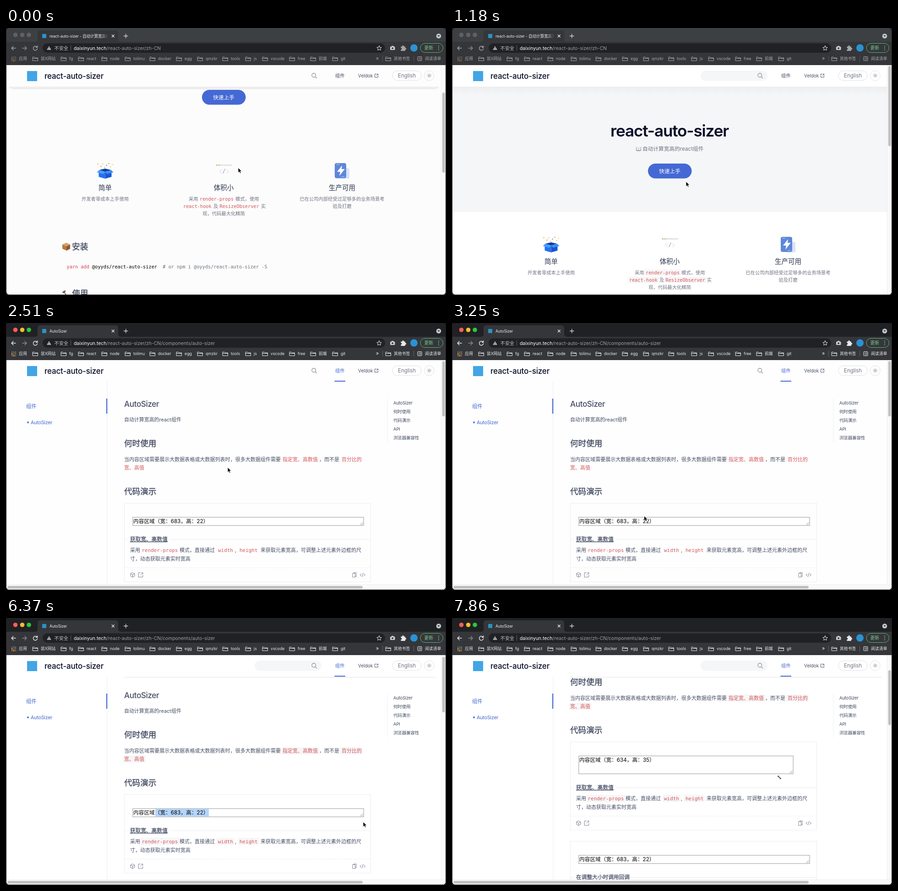
An HTML page for the animation above (8 s loop, 961 by 583 pixels).

```html
<!DOCTYPE html>
<html lang="zh-CN">
<head>
<meta charset="utf-8">
<title>react-auto-sizer</title>
<style>
  html, body { margin: 0; width: 100%; height: 100%; overflow: hidden; background: #21171c; }
  #stage { display: block; width: 100%; height: 100%; }
  text { font-family: Inter, "Noto Sans CJK SC", "Noto Sans CJK", sans-serif; white-space: pre; text-spacing-trim: space-all; }
  .mono { font-family: "DejaVu Sans Mono", "Noto Sans CJK SC", monospace; }
  .mid { text-anchor: middle; }
  .med { font-weight: 500; }
  .tight { letter-spacing: -.025em; }
  .line { fill: none; stroke-linecap: round; stroke-linejoin: round; }
</style>
</head>
<body>
<svg id="stage" viewBox="0 0 961 583"></svg>
<script>
const INK = '#454d64', SOFT = '#717484', BLUE = '#4569d4', RED = '#d4545a', RULE = '#ebedf1';

// Text is placed by its left edge (or middle) and its visual centre line.
const text = (x, cy, str, size, fill, cls = '', more = '') =>
  `<text x="${x}" y="${cy}" dy=".36em" font-size="${size}" fill="${fill}" class="${cls}" ${more}>${str}</text>`;
// The thin outline gives Chinese headings a medium weight.
const heading = (x, cy, str, size, more = '') =>
  text(x, cy, str, size, INK, '', `stroke="${INK}" stroke-width="${size * .022}" ${more}`);
const rect = (x, y, w, h, fill, r = 0, more = '') =>
  `<rect x="${x}" y="${y}" width="${w}" height="${h}" fill="${fill}" rx="${r}" ${more}/>`;
const dot = (x, y, r, fill, more = '') => `<circle cx="${x}" cy="${y}" r="${r}" fill="${fill}" ${more}/>`;
const line = (d, stroke, width = 1, more = '') =>
  `<path class="line" d="${d}" stroke="${stroke}" stroke-width="${width}" ${more}/>`;
const shape = (d, fill, more = '') => `<path d="${d}" fill="${fill}" ${more}/>`;
const group = (id, body, more = '') => `<g id="${id}" ${more}>${body}</g>`;
const at = (x, y, body) => `<g transform="translate(${x} ${y})">${body}</g>`;
const span = (str, fill) => `<tspan fill="${fill}">${str}</tspan>`;
const codeBack = (x, y, w, h) => rect(x, y, w, h, '#f7f6f7', 2, 'class="tinted"');
const openIcon = (x, y, r, c) =>
  at(x, y, line(`M${-r * .1} ${-r}H${-r}V${r}H${r}V${r * .1}M${r * .4} ${-r}H${r}V${-r * .4}M${r} ${-r}L0 0`, c, .9));

function browser() {
  const fg = '#e8eaed', dim = '#9aa0a6', green = '#81c995';
  const folder = x => line(`M${x + .5} 63.5h3.5l1.5 1.5h6v6.5h-11zM${x + .5} 66.5h11`, fg, 1);
  const folders = [[58, '装X网站'], [120, 'fg'], [158, 'react'], [209, 'node'], [260, 'tolimu'], [314, 'docker'],
    [372, 'egg'], [418, 'qmzkr'], [473, 'tools'], [523, 'js'], [560, 'vscode'], [619, 'free'], [665, '前端'],
    [713, 'git'], [829, '其他书签']];
  const apps = ['#ea4335', '#fbbc04', '#4285f4', '#34a853'];
  let grid = '';
  for (let i = 0; i < 9; i++) grid += rect(12 + i % 3 * 3.8, 62.5 + (i / 3 | 0) * 3.8, 2.5, 2.5, apps[i * 3 % 4]);

  return rect(0, 0, 961, 31, '#3c4043', 0, 'id="strip"')
    + [20.5, 35.5, 50].map(x => dot(x, 15, 4.8, '#5f6164', 'class="light"')).join('')
    + rect(0, 30, 961, 51, '#35363a')
    + shape('M63 30Q69 30 69 24V11Q69 5 75 5H239Q245 5 245 11V24Q245 30 251 30Z', '#35363a')
    + rect(79, 13, 9, 9, '#2f8fc4', 1)
    + `<svg x="95" y="5" width="130" height="25">${text(0, 12.5, '', 8.7, fg, '', 'id="tab" letter-spacing="-.02em"')}</svg>`
    + rect(208, 8, 18, 19, 'url(#fade)')
    + line('M231.3 15l5 5m0-5l-5 5', fg, 1.2) + line('M257.5 17.5h8.5m-4.25-4.25v8.5', '#d5d7da', 1.3)
    + dot(945, 17.5, 5.3, '#c4c7ca') + shape('M942.3 16h5.4l-2.7 3.3z', '#35363a')
    + rect(80, 33.5, 748, 20.5, '#202124', 10)
    + shape('M94 39.5l4.7 8.3h-9.4z', '#bdc1c6') + line('M94 42.5v2.3m0 1.6v.1', '#202124', 1)
    + text(105.5, 44, '不安全', 10.2, '#bdc1c6') + line('M141.5 38v11', '#5f6368')
    + text(148, 44, '', 10.4, dim, '', 'id="url"')
    + line('M815 38.8l1.5 3.4 3.7.3-2.8 2.5.8 3.6-3.2-1.9-3.2 1.9.8-3.6-2.8-2.5 3.7-.3z', fg, 1)
    + rect(839, 40.5, 10.5, 7.5, '#c9ccd0', 1.5) + rect(842, 39, 4.5, 3, '#c9ccd0', 1) + dot(844.2, 44.2, 1.9, '#35363a')
    + dot(891, 43.5, 8, '#2a92d6')
    + line('M36 44H45m-4-4l4 4-4 4', '#8b8f94', 1.3)
    + rect(905, 33.5, 49.5, 20, 'none', 10, 'stroke="#5bb974"')
    + text(913.5, 43.5, '更新', 9.8, green) + [39.5, 43.5, 47.5].map(y => dot(945, y, 1, green)).join('')
    + group('chromeInk',
      line('M21 44h-9m4-4l-4 4 4 4', fg, 1.4)
      + line('M67.6 41.5a4.5 4.5 0 1 0 .9 3.5M68.6 39v3.2h-3.2', fg, 1.4)
      + shape('M862.5 40.5h3a1.8 1.8 0 1 1 3.4 0h3v3a1.8 1.8 0 1 1 0 3.4v3h-9.4v-3.2a1.6 1.6 0 1 0 0-3z', fg)
      + grid + text(28, 67, '应用', 9, fg)
      + folders.map(([x, name]) => folder(x) + text(x + 18, 67, name, 8.8, fg)).join('')
      + text(808, 66.5, '»', 11, fg) + line('M822.5 61v12M890.5 61v12', '#5f6368')
      + rect(899, 62.5, 9, 9, 'none', 1, `stroke="${fg}"`)
      + line('M901 65h.2M901 67h.2M901 69h.2M903 65h3M903 67h3M903 69h3', fg, .9)
      + text(915, 67, '阅读清单', 8.9, fg));
}

function header() {
  return rect(0, 81, 951, 47, '#fff', 0, 'id="bar"')
    + rect(46, 94, 22, 22, '#41a5e6')
    + text(84, 105, 'react-auto-sizer', 17.05, '#080e29', 'med', 'letter-spacing="-.012em"')
    + rect(543, 93, 146, 22.5, '#f5f6f7', 11, 'class="tinted"')
    + dot(672.3, 103.2, 4.3, 'none', 'stroke="#7d8089" stroke-width="1.1"') + line('M675.6 106.6l3 3', '#7d8089', 1.2)
    + text(719, 104.5, '组件', 10.35, INK, '', 'id="navLink"')
    + rect(717.5, 126, 23.5, 2, BLUE, 0, 'id="navLine"')
    + text(769, 104.5, 'Veldok', 10, INK) + openIcon(809, 104, 3.5, INK)
    + rect(844, 93.5, 63, 21, '#fff', 10.5, 'stroke="#dfe1e6" fill-opacity=".4"') + text(875.5, 104.2, 'English', 11.4, SOFT, 'mid')
    + dot(924.3, 104, 10.8, 'none', 'stroke="#dfe1e6"') + dot(924.3, 104, 2.2, 'none', `stroke="${SOFT}"`)
    + dot(924.3, 104, 4.4, 'none', `stroke="${SOFT}" stroke-dasharray="1 2.455"`);
}

function home() {
  const bits = [[-16, -14, '#f7b32b'], [-9, -9, '#f59a3c'], [-5, -14, '#ffd257'], [3, -11, '#5aa2ff'], [8, -15, '#f7a52b'],
    [12, -8, '#ffcf4d'], [16, -13, '#fbd37a'], [-1, -6, '#ffb938']];
  const box = bits.map(([x, y, c]) => dot(x, y, 1.3, c)).join('')
    + shape('M-13-1L0-4 13-1 0 3z', '#0d3fa0') + shape('M-14 2L0 3V18L-14 14z', '#2272ef') + shape('M14 2L0 3V18L14 14z', '#1756d2')
    + shape('M-13-1L0 3-4 8-18 4z', '#4a9bff') + shape('M13-1L0 3 4 8 18 4z', '#3c8cf8');
  const snippet = rect(-18, -13, 36, 3, '#e3e3e6', 1) + ['#ee7b63', '#f3bd4f', '#73c06b'].map((c, i) => dot(-16 + i * 3, -11.5, 1, c)).join('')
    + line('M-5-2L-10 2l5 4M5-2l5 4-5 4', '#d3d7e1', 1) + line('M2-3L-2 6', '#7fa8e4', 1.2) + dot(1.8, -2.5, 1, '#f1c75b');
  const bolt = rect(-4, -5, 20, 23, '#d8e3f8', 3) + rect(-16, -16, 25, 33, '#5d87d9', 4)
    + shape('M0-11L-11 3h7l-2 9L6-3h-7z', '#fff') + line('M-12-13h6M-1 14h6', '#c8d7f5', 1.2);
  const red = (x, y, s) => text(x, y, s, 10.25, RED, 'mono');
  const grey = (x, y, s, cls) => text(x, y, s, 10.3, SOFT, cls);
  const titles = [[216.5, '简单'], [475.5, '体积小'], [734, '生产可用']];

  return rect(0, 81, 950, 321, '#f5f6f8', 0, 'id="hero"')
    + text(475, 224, 'react-auto-sizer', 35.1, '#080e29', 'mid', 'font-weight="600" letter-spacing="-.033em"')
    + shape('M402 260l5 1 6-1v8l-6 1-5-1z', '#8a9bab') + shape('M403 260l4 1v6l-4-.8zM412 260l-4.4 1v6l4.4-.8z', '#f0efe9')
    + text(416, 264, '自动计算宽高的react组件', 11.7, SOFT)
    + rect(428, 296, 95.5, 32.5, BLUE, 16.2) + text(475.5, 313, '快速上手', 11.8, '#fff', 'mid')
    + at(216.5, 472, box) + at(476, 472, snippet) + at(734, 472, bolt)
    + titles.map(([x, s]) => text(x, 510, s, 14.5, INK, 'mid', `stroke="${INK}" stroke-width=".2"`)).join('')
    + codeBack(420, 527, 80, 14) + codeBack(384, 543, 68, 14) + codeBack(463, 543, 93, 14)
    + grey(216.5, 534, '开发者零成本上手使用', 'mid')
    + grey(399, 534, '采用') + red(423, 534, 'render-props') + grey(501, 534, '模式，使用')
    + red(387, 550, 'react-hook') + grey(453, 550, '及') + red(466.5, 550, 'ResizeObserver') + grey(557, 550, '实')
    + grey(475.5, 566, '现，代码最大化精简', 'mid')
    + grey(734, 534, '已在公司内部经受过足够多的业务场景考', 'mid') + grey(734, 550, '验及打磨', 'mid')
    + shape('M123 634l9-4 8 4v9l-8 4-9-4z', '#b57b45') + shape('M123 634l9-4 8 4-8 4z', '#d6a368') + shape('M132 638l8-4v9l-8 4z', '#8f5a30')
    + heading(144, 639, '安装', 17.7)
    + text(132.5, 682, span('yarn add', '#de3d58') + ' @oyyds/react-auto-sizer  ' + span('# or npm i @oyyds/react-auto-sizer -S', '#6a737d'), 10.25, '#000', 'mono')
    + line('M127 737l6 10', '#9a6a45', 2) + shape('M122 739l5-5 4 1-4 5z', '#5d6268') + heading(144, 741, '使用', 17.7);
}

function card(y, title, id) {
  const p = (x, cy, s) => text(x, cy, s, 11, INK), c = (x, s) => text(x, 496, s, 10.93, RED, 'mono');
  return at(0, y,
    rect(258.5, 393.5, 538, 171.5, 'none', 0, `id="${id}Frame" stroke="${RULE}"`)
    + rect(276.7, 424.2, 504.5, 18, '#fff', 0, `id="${id}Box" stroke="#b5b5b5" stroke-width="1.4"`)
    + rect(326, 425, 117, 16.5, '#b4d5fd', 0, `id="${id}Pick"`)
    + text(278, 433, '内容区域（宽：683，高：22）', 11.7, '#000', '', `id="${id}Label"`)
    + group(id + 'Grip', line('M774 440.5l5-5m-2 5l2-2', '#777', .8))
    + group(id + 'Foot',
      line('M258.5 472.5H796.5', RULE) + rect(266, 465, 92, 15, '#fefefe')
      + heading(271, 472, title, 11.7, 'text-decoration="underline"')
      + codeBack(293.5, 488, 85, 16) + codeBack(460, 488, 39, 16) + codeBack(506.5, 488, 46, 16)
      + p(271, 496, '采用') + c(296.5, 'render-props') + p(379, 496, '模式，直接通过') + c(463, 'width') + p(500, 496, ',')
      + c(510, 'height') + p(556, 496, '来获取元素宽高，可调整上述元素外边框的尺') + p(271, 515, '寸，动态获取元素实时宽高')
      + line('M258.5 534.5H796.5', RULE, 1, 'stroke-dasharray="2 2"')
      + line('M276.5 545l4.5 2.5v5l-4.5 2.5-4.5-2.5v-5zM272 547.5l4.5 2.5 4.5-2.5M276.5 550v5', SOFT, .9)
      + openIcon(294, 550, 4.8, SOFT)
      + line('M757.5 546.5h5v8.5h-5zM759.5 546v-1h5.5v8.5h-2', SOFT, .9)
      + line('M776 547.5l-3 2.5 3 2.5M781.5 547.5l3 2.5-3 2.5M780 546l-2.5 8', SOFT, .9)));
}

const docs = () => text(258, 177, 'AutoSizer', 17.2, INK, 'med tight')
  + text(258, 211.5, '自动计算宽高的react组件', 10.95, INK)
  + heading(258, 263, '何时使用', 17.6)
  + codeBack(601, 290, 83, 16) + codeBack(730, 290, 49, 16) + codeBack(256, 308, 49, 16)
  + text(258, 298, '当内容区域需要展示大数据表格或大数据列表时，很多大数据组件需要', 11.04, INK)
  + text(604, 298, '指定宽、高数值', 11, RED) + text(684, 298, '，而不是', 11, INK)
  + text(733, 298, '百分比的', 11, RED) + text(258, 316, '宽、高值', 11, RED)
  + heading(258, 368, '代码演示', 17.6)
  + card(0, '获取宽、高数值', 'main') + card(196, '在调整大小时调用回调', 'next');

const docsRails = () => line('M221 128.5V571', RULE) + rect(219, 165, 2.2, 33, BLUE)
  + text(44, 182, '组件', 11.3, BLUE) + dot(48, 217, 1.9, BLUE) + text(54, 217, 'AutoSizer', 10.8, BLUE, 'tight')
  + line('M833 165.5V260', RULE)
  + ['AutoSizer', '何时使用', '代码演示', 'API', '浏览器兼容性'].map((s, i) => text(846, 174.5 + i * 19.1, s, 9.6, INK, 'tight')).join('');

const pointers = () => {
  const rim = 'stroke="#fff" stroke-width="1" stroke-linejoin="round"';
  const beam = 'M-2.5-6Q0-6 0-4.5 0-6 2.5-6M0-4.5V4.5M-2.5 6Q0 6 0 4.5 0 6 2.5 6';
  return group('arrow', shape('M0 0V11.2L2.6 8.9 4.4 12.6 6.3 11.7 4.6 8H8z', '#000', rim))
    + group('hand', shape('M-2-5.5Q-1-7.2 0-5.5V-1.5L4 0Q5.3.7 4.8 3L4 6H-1.5L-4.6 2Q-5.2.4-3.8.4L-2 1.8z', '#fff', 'stroke="#000" stroke-width=".9"')
      + line('M.6 1.5v2.3M2.4 1.5v2.3', '#000', .6))
    + group('beam', line(beam, '#fff', 2.2) + line(beam, '#000', 1))
    + group('size', shape('M-4-4H0L-1.3-2.7 2.7 1.3 4 0V4H0L1.3 2.7-2.7-1.3-4 0z', '#000', rim));
};

document.getElementById('stage').innerHTML = `<defs>
  <clipPath id="window">${rect(1, 0, 959, 582, '#000', 6)}</clipPath>
  <clipPath id="view">${rect(0, 81, 950, 502, '#000')}</clipPath>
  <linearGradient id="fade"><stop stop-color="#35363a" stop-opacity="0"/><stop offset=".85" stop-color="#35363a"/></linearGradient>
  <linearGradient id="shade" x2="0" y2="1"><stop stop-opacity=".035"/><stop offset="1" stop-opacity="0"/></linearGradient>
  </defs>`
  + rect(0, 0, 961, 583, '#21171c')
  + `<g clip-path="url(#window)">${rect(0, 81, 961, 502, '#fff', 0, 'id="paper"')}
  <g clip-path="url(#view)">${group('home', home())}${group('docs', docs())}${group('rails', docsRails())}
  ${shape('M6 128H946Q944 134 930 134H22Q8 134 6 128z', '#efefef', 'id="band"')}
  ${rect(1, 128, 949, 18, 'url(#shade)', 0, 'id="shadow"')}${rect(258, 128, 680, 3, '#f4f4f5', 0, 'id="rule"')}
  ${header()}</g>
  ${rect(950, 81, 10, 502, '#fafafa')}${line('M950.5 81V583', '#ececec')}
  ${rect(952.8, 83, 6, 175, '#c1c1c1', 3, 'id="thumb"')}
  ${group('across', rect(0, 571, 961, 12, '#fafafa') + line('M0 571.5H961', '#ececec') + rect(3, 574, 776, 6, '#c1c1c1', 3))}
  ${browser()}</g>` + pointers();

const tones = {
  pale: { paper: '#fcfcfc', hero: '#fcfcfc', heroEnd: 402, bar: '#fdfdfd', band: '#eeeeee' },
  full: { paper: '#ffffff', hero: '#f5f6f8', heroEnd: 402, bar: '#ffffff', tinted: true },
  cool: { paper: '#fafafa', hero: '#f6f7f9', heroEnd: 332, bar: '#f9fafb', band: '#eef0f2' },
  flat: { paper: '#fefefe', hero: '#fefefe', heroEnd: 402, bar: '#fefefe' }
};

// Each step changes only the listed parts; everything else carries over.
const steps = [
  [0, { page: 'home', active: false, tone: 'pale', scroll: 161, cursor: ['arrow', 507, 305], pick: 0, box: [504.5, 18], size: [683, 22] }],
  [140, { tone: 'full', scroll: 152 }], [290, { scroll: 126 }], [440, { scroll: 90 }], [590, { scroll: 54 }],
  [740, { scroll: 25 }], [890, { scroll: 7 }],
  [1030, { scroll: 0, cursor: ['arrow', 509, 318] }], [1180, { cursor: ['arrow', 511, 335] }],
  [1330, { cursor: ['arrow', 499, 329] }], [1470, { cursor: ['hand', 485, 322] }],
  [1770, { active: true, tone: 'cool' }],
  [2220, { page: 'docs', tone: 'flat' }], [2370, { cursor: ['arrow', 484, 315] }],
  [2960, { cursor: ['arrow', 471, 341] }], [3110, { cursor: ['arrow', 440, 390] }], [3250, { cursor: ['arrow', 419.5, 421] }],
  [3400, { cursor: ['beam', 436, 430] }], [3550, { cursor: ['beam', 446, 434] }],
  [3850, { cursor: ['beam', 418, 434], pick: 417 }], [4000, { cursor: ['beam', 381, 434], pick: 382 }],
  [4150, { cursor: ['beam', 338, 434], pick: 337 }], [4300, { cursor: ['beam', 326, 433], pick: 326 }],
  [4590, { cursor: ['beam', 327, 433] }], [4740, { cursor: ['beam', 328, 433] }],
  [5190, { cursor: ['beam', 350, 434] }], [5340, { cursor: ['beam', 425, 436] }], [5490, { cursor: ['arrow', 530, 439] }],
  [5630, { cursor: ['arrow', 640, 444] }], [5780, { cursor: ['arrow', 722, 450] }], [5930, { cursor: ['arrow', 768, 454] }],
  [6080, { cursor: ['arrow', 786, 453] }], [6220, { cursor: ['arrow', 780, 445] }],
  [6370, { tone: 'full', scroll: 8 }], [6520, { scroll: 31 }], [6670, { scroll: 64 }], [6820, { scroll: 97 }],
  [6960, { scroll: 117, cursor: ['arrow', 780, 405] }], [7110, { scroll: 123, cursor: ['arrow', 779, 345], pick: 0 }],
  [7260, { cursor: ['size', 778, 317] }],
  [7710, { cursor: ['size', 745, 328], box: [468.5, 26], size: [634, 35] }],
  [7860, { cursor: ['size', 715, 348], box: [468.5, 39] }]
];
let carried = {};
const states = steps.map(([time, change]) => ({ time, ...(carried = { ...carried, ...change }) }));

const el = id => document.getElementById(id);
const set = (id, attrs) => { for (const k in attrs) el(id).setAttribute(k, attrs[k]); };
const show = (node, on) => { node.style.display = on ? '' : 'none'; };
const move = (id, x, y) => set(id, { transform: `translate(${x} ${y})` });

function render(s) {
  const tone = tones[s.tone], isHome = s.page === 'home', [w, h] = s.box, grow = h - 18;
  ['home', 'docs'].forEach(id => { show(el(id), s.page === id); move(id, 0, -s.scroll); });
  ['rails', 'across', 'navLine'].forEach(id => show(el(id), !isHome));
  show(el('band'), isHome && tone.band);
  show(el('shadow'), isHome && tone.tinted);
  show(el('rule'), !isHome && tone.tinted);
  document.querySelectorAll('.tinted').forEach(node => show(node, tone.tinted));
  set('paper', { fill: tone.paper });
  set('bar', { fill: tone.bar });
  set('band', { fill: tone.band || 'none' });
  set('hero', { fill: tone.hero, height: tone.heroEnd - 81 });
  set('navLink', { fill: isHome ? INK : BLUE });
  set('thumb', isHome ? { y: 83 + s.scroll * .36, height: 175 } : { y: 83 + s.scroll * .252, height: 121 - grow * .05 });

  set('strip', { fill: s.active ? '#202124' : '#3c4043' });
  set('chromeInk', { opacity: s.active ? 1 : .62 });
  document.querySelectorAll('.light').forEach((node, i) =>
    node.setAttribute('fill', s.active ? ['#fe5f57', '#febc2e', '#28c840'][i] : '#5f6164'));
  el('tab').textContent = isHome ? 'react-auto-sizer - 自动计算宽高的' : 'AutoSizer';
  el('url').innerHTML = span('daixinyun.tech', '#fff') + '/react-auto-sizer/zh-CN' + (isHome ? '' : '/components/auto-sizer');

  set('mainBox', { width: w, height: h });
  set('mainFrame', { height: 171.5 + grow });
  move('mainFoot', 0, grow);
  move('mainGrip', w - 504.5, grow);
  ['nextFrame', 'nextBox', 'nextLabel', 'nextGrip', 'nextFoot'].forEach(id => move(id, 0, grow));
  el('mainLabel').textContent = `内容区域（宽：${s.size[0]}，高：${s.size[1]}）`;
  show(el('nextPick'), false);
  show(el('mainPick'), s.pick);
  if (s.pick) set('mainPick', { x: s.pick, width: 443 - s.pick });

  const [kind, x, y] = s.cursor;
  ['arrow', 'hand', 'beam', 'size'].forEach(id => show(el(id), id === kind));
  move(kind, x, y);
}

const start = performance.now();
let current;
function tick() {
  const now = (performance.now() - start) % 8000;
  const state = states.findLast(s => s.time <= now);
  if (state !== current) render(current = state);
  requestAnimationFrame(tick);
}
tick();
</script>
</body>
</html>
```
